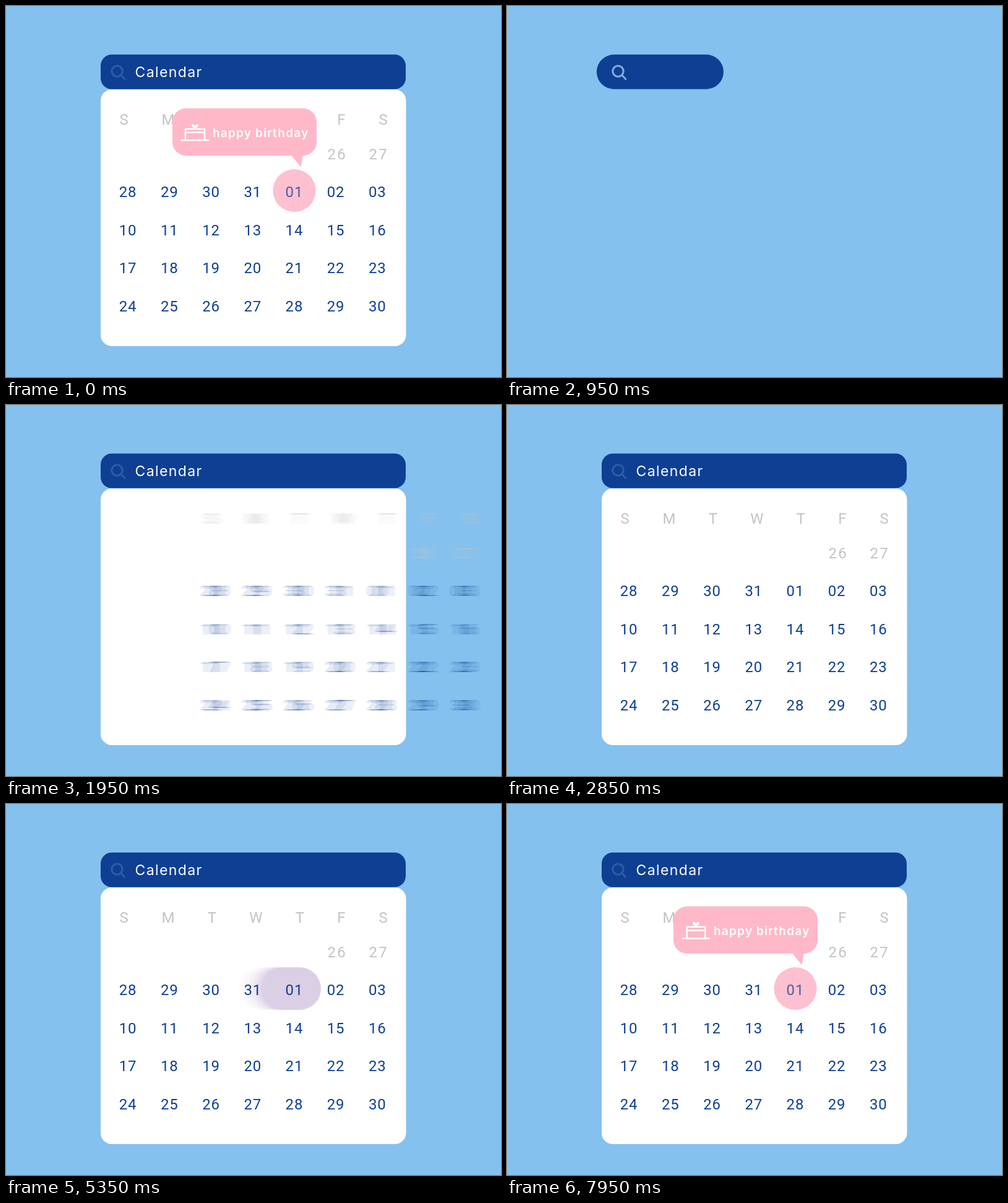
Recreate the animation shown at these times as an HTML page with a canvas. Size 800 by 600 pixels, loop 8000 ms.

```html
<!DOCTYPE html>
<html lang="en">
<head>
<meta charset="utf-8">
<title>Calendar</title>
<style>
  html, body { margin: 0; width: 100%; height: 100%; overflow: hidden; background: #84c1ee; }
  canvas { display: block; }
</style>
</head>
<body>
<canvas id="stage" width="800" height="600"></canvas>
<script>
const ctx = document.getElementById('stage').getContext('2d');
const layer = document.createElement('canvas');
layer.width = 800;
layer.height = 600;
const mask = layer.getContext('2d');

const LOOP = 8000, CUT = 550, SHUTTER = 25;
const NAVY = '#0e3f93', PINK = '#ffb8c8', GRAY = '#c2c3c7';

const clamp = v => Math.min(1, Math.max(0, v));
const ramp = (t, from, to) => clamp((t - from) / (to - from));

// Smooth monotone curve through [time, value] points
function track(t, points) {
  const last = points.length - 1;
  if (t <= points[0][0]) return points[0][1];
  if (t >= points[last][0]) return points[last][1];
  const i = points.findIndex(p => p[0] > t) - 1;
  const slope = k => (points[k + 1][1] - points[k][1]) / (points[k + 1][0] - points[k][0]);
  const tangent = k => {
    if (k === 0 || k === last) return 0;
    const a = slope(k - 1), b = slope(k);
    return a * b > 0 ? 2 * a * b / (a + b) : 0;
  };
  const [t0, v0] = points[i], [t1, v1] = points[i + 1];
  const d = t1 - t0, u = (t - t0) / d, r = 1 - u;
  return v0 * (1 + 2 * u) * r * r + d * tangent(i) * u * r * r
    + v1 * u * u * (3 - 2 * u) - d * tangent(i + 1) * u * u * r;
}

function box(c, left, top, right, bottom, radius) {
  c.beginPath();
  c.roundRect(left, top, right - left, bottom - top, radius);
  c.fill();
}

// Averages a shape over the shutter time, then tints it
function blurred(color, t, samples, paint) {
  mask.globalCompositeOperation = 'source-over';
  mask.globalAlpha = 1;
  mask.clearRect(0, 0, 800, 600);
  mask.globalCompositeOperation = 'lighter';
  mask.globalAlpha = 1 / samples;
  mask.fillStyle = '#000';
  for (let k = 0; k < samples; k++) paint(t + SHUTTER * ((k + 0.5) / samples - 0.5));
  mask.globalCompositeOperation = 'source-in';
  mask.globalAlpha = 1;
  mask.fillStyle = color;
  mask.fillRect(0, 0, 800, 600);
  ctx.drawImage(layer, 0, 0);
}

function typeText(text, x, y, t, start, step) {
  ctx.fillStyle = '#fff';
  [...text].forEach((letter, i) => {
    ctx.globalAlpha = ramp(t, start + i * step, start + i * step + 90);
    ctx.fillText(letter, x + ctx.measureText(text.slice(0, i)).width, y);
  });
  ctx.globalAlpha = 1;
}

function line(points) {
  ctx.beginPath();
  points.forEach(([x, y]) => ctx.lineTo(x, y));
  ctx.stroke();
}

function drawBar(t) {
  const left = track(t, [[870, 153], [950, 145], [1090, 129], [1260, 156], [1420, 153]]);
  const right = track(t, [[870, 209], [950, 348], [1090, 668], [1260, 639], [1420, 646]]);
  const pop = track(t, [[580, 0], [740, 1.08], [840, 1]]);
  ctx.save();
  if (t < 870) {
    ctx.translate(181, 106.5);
    ctx.scale(pop, pop);
    ctx.translate(-181, -106.5);
  }
  ctx.fillStyle = NAVY;
  box(ctx, left, 78.5, right, 134.5, track(t, [[950, 28], [1350, 18]]));
  ctx.strokeStyle = `rgba(160,195,245,${track(t, [[1300, 0.82], [1760, 0.22]])})`;
  ctx.lineWidth = 3;
  ctx.lineCap = 'round';
  ctx.beginPath();
  ctx.arc(179.5, 105.5, 8.7, Math.PI / 4, Math.PI * 2.25);
  ctx.lineTo(191.8, 118.2);
  ctx.stroke();
  ctx.restore();
  ctx.font = '23px Inter, sans-serif';
  ctx.letterSpacing = '1.4px';
  typeText('Calendar', 208.5, 115, t, 1320, 50);
}

function drawCard(t) {
  const bottom = 134.5 + 415.5 * (1 - (1 - ramp(t, 1350, 1800)) ** 3);
  if (bottom < 136) return;
  ctx.fillStyle = '#fff';
  box(ctx, 153, 135, 646.5, bottom, Math.min(18, (bottom - 135) / 2));
}

function drawPill(t, pink) {
  if (t < 3600) return;
  const channel = (a, b, c) => Math.round(track(t, [[5260, a], [5350, b], [5480, c]]));
  const color = `rgb(${channel(232, 219, 253)},${channel(240, 207, 192)},${channel(253, 230, 208)})`;
  const moving = t < 4700 || (t > 5200 && t < 5700);
  const paint = time => {
    const left = track(time, [[3700, 163], [3900, 162], [4050, 147], [4300, 153], [4700, 170],
      [5280, 170], [5350, 400], [5400, 437], [5480, 440], [5650, 431.5]]);
    const right = track(time, [[3700, 231], [3900, 566], [4050, 635], [4300, 539], [4650, 509],
      [5350, 509], [5600, 500.5]]);
    const inset = 34.5 * (1 - track(time, [[3600, 0], [3720, 1]]));
    box(mask, left + inset, 264 + inset, right - inset, 333 - inset, 34.5 - inset);
  };
  ctx.globalAlpha = pink;
  blurred(color, t, moving ? 15 : 1, paint);
  ctx.globalAlpha = 1;
}

function drawDates(t) {
  if (t < 1720) return;
  const samples = t < 2500 ? 15 : 1;
  const slide = time => 620 * (1 - ramp(time, 1720, 2467)) ** 4;
  mask.font = '24px Roboto, sans-serif';

  blurred(GRAY, t, samples, time => {
    const dx = slide(time);
    mask.textAlign = 'center';
    mask.letterSpacing = '0px';
    [...'SMTWTFS'].forEach((day, i) =>
      mask.fillText(day, [190.5, 262, 333, 404, 475, 542, 609.5][i] + dx, 191.5));
    mask.textAlign = 'left';
    mask.letterSpacing = '2.2px';
    mask.fillText('26', 519.5 + dx, 247.5);
    mask.fillText('27', 586.5 + dx, 247.5);
  });

  blurred(NAVY, t, samples, time => {
    const dx = slide(time);
    mask.letterSpacing = '0.8px';
    for (let n = 0; n < 28; n++) {
      const col = n % 7, row = Math.floor(n / 7);
      const date = row ? n + 3 : n < 4 ? n + 28 : n - 3;
      mask.fillText(String(date).padStart(2, '0'), 182.8 + 67.2 * col + dx, 309 + 61.5 * row);
    }
  });
}

function drawCake(t) {
  if (t < 6550) return;
  const shift = track(t, [[6980, 156], [7260, -5], [7400, 0]]);
  const wobble = t < 7500 ? 0 : 0.04 * Math.sin((t - 8000) / 32) * Math.exp((7950 - t) / 400);
  ctx.save();
  ctx.translate(305.5 + shift, 205.5);
  ctx.scale(1 + wobble, 1 - wobble);
  ctx.strokeStyle = ctx.fillStyle = '#fff';
  ctx.lineWidth = 2.5;
  ctx.lineCap = 'butt';

  const middle = ramp(t, 6550, 6610);
  line([[16, -1], [16 - 32 * middle, -1]]);
  ctx.setLineDash([70 * ramp(t, 6620, 6820), 100]);
  line([[15.5, 12], [15.5, -6.5], [-15.5, -6.5], [-15.5, 12]]);
  ctx.setLineDash([]);
  const base = 23 * ramp(t, 6700, 6880);
  line([[-base, 11.5], [base, 11.5]]);

  const topper = track(t, [[6800, 0], [6920, 1.2], [7000, 1]]);
  ctx.translate(0, -7);
  ctx.scale(topper, topper);
  ctx.beginPath();
  ctx.moveTo(0, 0);
  ctx.bezierCurveTo(-4, -2, -6, -4, -5.5, -7);
  ctx.quadraticCurveTo(-2.5, -8, 0, -5);
  ctx.quadraticCurveTo(2.5, -8, 5.5, -7);
  ctx.bezierCurveTo(6, -4, 4, -2, 0, 0);
  ctx.fill();
  ctx.restore();
}

function drawBubble(t) {
  const size = track(t, [[6030, 0], [6190, 1.36], [6340, 0.94], [6480, 1]]);
  if (!size) return;
  ctx.save();
  ctx.translate(385.5, 204);
  ctx.scale(size, size);
  ctx.translate(-385.5, -204);
  ctx.fillStyle = PINK;
  box(ctx, 269, 165.5, 502, 242, 22);
  ctx.beginPath();
  ctx.moveTo(460, 240);
  ctx.lineTo(480, 240);
  ctx.lineTo(476.5, 260.5);
  ctx.fill();
  ctx.restore();
  drawCake(t);
  ctx.font = '600 19px Inter, sans-serif';
  ctx.letterSpacing = '1.2px';
  typeText('happy birthday', 334, 211.5, t, 7180, 36);
}

function frame(now) {
  const phase = now % LOOP;
  // The finished calendar holds past the loop point until the cut
  const t = phase < CUT ? phase + LOOP : phase;
  ctx.fillStyle = '#84c1ee';
  ctx.fillRect(0, 0, 800, 600);
  drawCard(t);
  drawBar(t);
  drawPill(t, 1);
  drawDates(t);
  if (t > 5350) drawPill(t, 0.25 * ramp(t, 5350, 5480));
  drawBubble(t);
  requestAnimationFrame(frame);
}
const begin = performance.now();
requestAnimationFrame(function tick() {
  frame(Math.max(0, performance.now() - begin));
});
</script>
</body>
</html>
```
